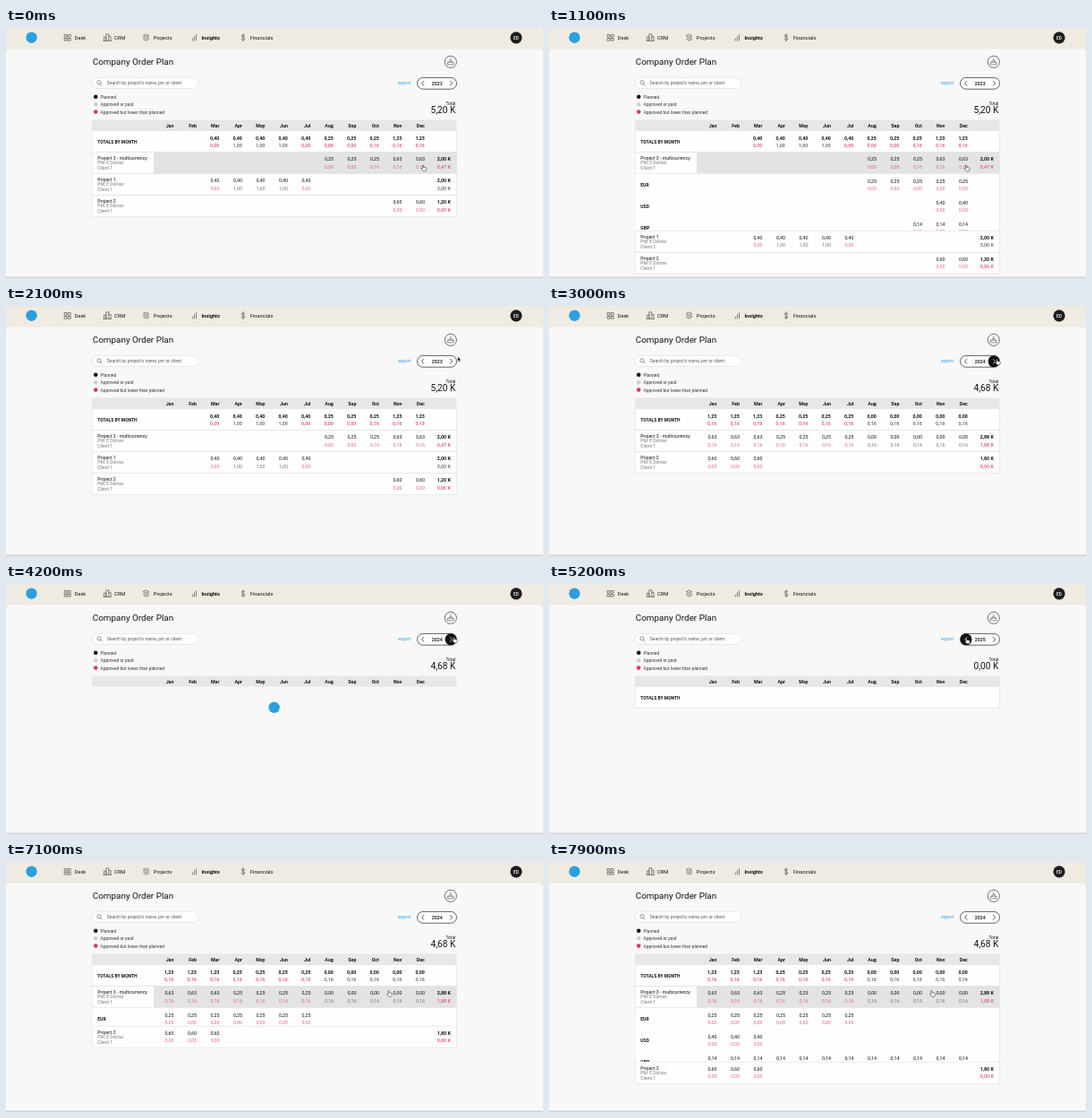
These frames come from a looping animation (600 px wide and 279 px high, 8000 ms). An HTML page:

```html
<!DOCTYPE html>
<html lang="en">
<head>
<meta charset="utf-8">
<title>Company Order Plan</title>
<style>
  html, body { margin: 0; width: 100%; height: 100%; overflow: hidden; background: #f8f8f8; }
  svg { display: block; width: 100%; height: 100%; }
  text { font-family: Roboto, Inter, sans-serif; white-space: pre; }
</style>
</head>
<body>
<svg id="stage" viewBox="0 0 600 279">
  <defs>
    <clipPath id="page"><rect width="600" height="275.5"/></clipPath>
    <clipPath id="drawer"><rect id="drawerClip" x="96" y="162.5" width="408" height="0"/></clipPath>
  </defs>
</svg>
<script>
const LOOP = 8000, ROW = 24, TABLE = { x: 96, w: 407.5 };
const INK = '#111', GREY = '#777', PINK = '#e0688f', LINE = '#dedede', BLUE = '#2b9fe0';
const MONTHS = 'Jan Feb Mar Apr May Jun Jul Aug Sep Oct Nov Dec'.split(' ');
const PM = 'PM: E Dolivar';

// Cells are runs: [first month, count, planned, approved]
const YEARS = {
  2023: {
    total: '5,20 K',
    months: [[2, 1, .4, 0], [3, 3, .4, 1], [6, 1, .4, 0], [7, 2, .25, 0], [9, 1, .25, .16], [10, 2, 1.23, .16]],
    projects: [
      { name: 'Project 3 - multicurrency', cells: [[7, 2, .25, 0], [9, 1, .25, .16], [10, 2, .63, .16]], sum: [2, .47] },
      { name: 'Project 1', cells: [[2, 1, .4, 0], [3, 3, .4, 1], [6, 1, .4, 0]], sum: [2, 3] },
      { name: 'Project 2', cells: [[10, 2, .6, 0]], sum: [1.2, 0] }
    ],
    currencies: { EUR: [[7, 5, .25, 0]], USD: [[10, 2, .4, 0]], GBP: [[9, 3, .14, 0]] }
  },
  2024: {
    total: '4,68 K',
    months: [[0, 3, 1.23, .16], [3, 4, .25, .16], [7, 5, 0, .16]],
    projects: [
      { name: 'Project 3 - multicurrency', cells: [[0, 3, .63, .16], [3, 4, .25, .16], [7, 5, 0, .16]], sum: [2.88, 1.88] },
      { name: 'Project 2', cells: [[0, 3, .6, 0]], sum: [1.8, 0] }
    ],
    currencies: { EUR: [[0, 7, .25, 0]], USD: [[0, 3, .4, 0]], GBP: [[0, 12, .14, 0]] }
  },
  2025: { total: '0,00 K', months: [], projects: [], currencies: {} }
};

// [start, year, loading]
const SCENES = [[0, 2023, 0], [2500, 2023, 1], [2900, 2024, 0], [4200, 2024, 1],
  [4500, 2025, 0], [5500, 2025, 1], [5800, 2024, 0]];

// [time, x, y]
const POINTER = [[1550, 465, 153], [1700, 478, 128], [1800, 498, 95], [1900, 511, 65], [2000, 513, 51],
  [2100, 504.7, 56.3], [2200, 500.5, 59], [2400, 499.5, 59], [4750, 499.5, 59], [5000, 482, 61],
  [5200, 465.5, 60], [5850, 465.5, 60], [5970, 456, 66], [6100, 440.5, 77.5], [6200, 438.5, 93],
  [6300, 437, 103], [6500, 430, 130], [6600, 428, 140], [6700, 426.5, 143.5]];
const NEXT_FILL = [[2130, 0], [2300, 1], [4850, 1], [5050, 0]];
const PREV_FILL = [[5000, 0], [5180, 1], [6080, 1], [6300, 0]];

const stage = document.getElementById('stage');

function add(parent, tag, attrs) {
  const el = document.createElementNS('http://www.w3.org/2000/svg', tag);
  for (const key in attrs) el.setAttribute(key, attrs[key]);
  return parent.appendChild(el);
}
const group = (parent, attrs) => add(parent, 'g', attrs);
const box = (parent, x, y, width, height, fill, more) => add(parent, 'rect', { x, y, width, height, fill, ...more });
const disc = (parent, cx, cy, r, fill, more) => add(parent, 'circle', { cx, cy, r, fill, ...more });
const stroke = (parent, d, color, width, more) => add(parent, 'path',
  { d, fill: 'none', stroke: color, 'stroke-width': width, 'stroke-linecap': 'round', 'stroke-linejoin': 'round', ...more });

// Text centred vertically on cy
function label(parent, x, cy, content, size, fill = INK, weight = 400, anchor = 'start') {
  const el = add(parent, 'text', { x, y: cy + size * .36, 'font-size': size, fill, 'font-weight': weight, 'text-anchor': anchor });
  el.textContent = content;
  return el;
}

const amount = n => n.toFixed(2).replace('.', ',');
const columnEnd = i => 187.4 + 25.5 * i;

function pair(parent, x, y, planned, approved, bold, unit = '') {
  const weight = bold ? 700 : 400;
  label(parent, x, y, amount(planned) + unit, 5.3, INK, weight, 'end');
  label(parent, x, y + 8.2, amount(approved) + unit, 5.3, approved < planned ? PINK : GREY, weight, 'end');
}

function cells(parent, y, runs, bold) {
  for (const [first, count, planned, approved] of runs)
    for (let i = first; i < first + count; i++) pair(parent, columnEnd(i), y, planned, approved, bold);
}

function projectRow(parent, y, project) {
  label(parent, 102.3, y + 6.7, project.name, 5.15);
  label(parent, 102.3, y + 12.2, PM, 4.95, GREY);
  label(parent, 102.3, y + 17.8, 'Client 1', 5, GREY);
  cells(parent, y + 8, project.cells);
  pair(parent, 496.8, y + 8, ...project.sum, true, ' K');
}

function rowBox(parent, y, height) {
  box(parent, TABLE.x, y, TABLE.w, height, '#fefefe', { stroke: LINE, 'stroke-width': .6 });
}

function buildYear(parent, data) {
  const root = group(parent), top = 138.5;
  rowBox(root, 114.5, ROW);
  label(root, 102.3, 127, 'TOTALS BY MONTH', 4.95, INK, 700);
  cells(root, 122.7, data.months, true);
  if (!data.projects.length) return { root };

  rowBox(root, top, ROW);
  const hover = box(root, 165, top, 338.5, ROW, '#e3e3e3');
  projectRow(root, top, data.projects[0]);

  const drawer = group(root, { 'clip-path': 'url(#drawer)' });
  box(drawer, TABLE.x, top + ROW, TABLE.w, ROW * 3, '#fefefe', { stroke: LINE, 'stroke-width': .6 });
  Object.entries(data.currencies).forEach(([code, runs], i) => {
    const y = top + ROW * (i + 1);
    label(drawer, 102.3, y + 12.5, code, 5, INK, 700);
    cells(drawer, y + 8.5, runs);
  });

  const below = group(root);
  data.projects.slice(1).forEach((project, i) => {
    const y = top + ROW * (i + 1);
    rowBox(below, y, ROW);
    projectRow(below, y, project);
  });
  return { root, hover, below };
}

function buildNavigation() {
  box(stage, 0, 0, 600, 30, '#efebe2');
  add(stage, 'path', { d: 'M0 279V28Q0 23.5 5 23.5H595Q600 23.5 600 28V279Z', fill: '#f8f8f8' });
  disc(stage, 28.5, 10.7, 6.2, BLUE);
  const icons = group(stage);
  const pen = d => stroke(icons, d, '#555', .7);
  pen('M65.5 7.5h2.6v2.6h-2.6zM69.6 7.5h2.6v2.6h-2.6zM65.5 11.5h2.6v2.6h-2.6zM69.6 11.5h2.6v2.6h-2.6z');
  pen('M109.5 14.3V10h2.3v4.3M111.8 14.3V6.8h3v7.5M114.8 9.3h2.3v5M109 14.3h8.5');
  pen('M156.7 7.2l3 1.4-3 1.4-3-1.4zM153.7 10.6l3 1.4 3-1.4M153.7 12.6l3 1.4 3-1.4');
  pen('M208.3 14v-2M210.4 14V9.5M212.5 14V7.5');
  pen('M266.8 8.8Q266.4 7.9 265 7.9Q263.3 8 263.3 9.2Q263.4 10.3 265 10.6Q266.8 10.9 266.8 12.2Q266.7 13.4 265 13.4Q263.4 13.4 263 12.3M265 6.8v7.8');
  [['Desk', 76.7], ['CRM', 121], ['Projects', 164.8], ['Insights', 218.4], ['Financials', 272.7]]
    .forEach(([name, x]) => label(stage, x, 10.8, name, 5.7, INK, name === 'Insights' ? 700 : 400));
  disc(stage, 570, 10.8, 6.6, '#1d1d1f');
  label(stage, 570, 10.8, 'ED', 4.8, '#fff', 500, 'middle');
}

function buildToolbar() {
  label(stage, 96.8, 37.8, 'Company Order Plan', 9.9);
  disc(stage, 496.8, 37.8, 6.6, '#fafafa', { stroke: '#333', 'stroke-width': .7 });
  stroke(stage, 'M493.6 38.2h6.4v2.6h-6.4zM495 38l.8-1.6h2l.8 1.6M496.8 34v1.6', '#444', .6);
  box(stage, 96, 55.3, 119, 12.2, '#fff', { rx: 6.1, stroke: '#d8d8d8', 'stroke-width': .6 });
  disc(stage, 104, 60.8, 2.1, 'none', { stroke: '#666', 'stroke-width': .7 });
  stroke(stage, 'M105.6 62.4l1.8 1.8', '#666', .7);
  label(stage, 112.8, 61.4, "Search by project's name, pm or client", 4.98, '#555');
  label(stage, 437.9, 61.5, 'export', 5, BLUE);
  [['Planned', '#111'], ['Approved or paid', '#cfcfcf'], ['Approved but lower than planned', '#d9386c']]
    .forEach(([name, color], i) => {
      disc(stage, 100.2, 76.8 + i * 8.4, 2.3, color);
      label(stage, 105.5, 77 + i * 8.4, name, 4.9, '#333');
    });
  label(stage, 502.3, 84.3, 'Total', 4.9, INK, 400, 'end');
}

function buildPager() {
  box(stage, 459.5, 55.4, 44, 12.8, '#fdfdfd', { rx: 6.4, stroke: '#222', 'stroke-width': .7 });
  const button = (x, d) => ({ disc: disc(stage, x, 61.8, 6.5, '#111'), arrow: stroke(stage, d, INK, .7) });
  return {
    prev: button(466, 'M466.8 59.4l-2.2 2.4 2.2 2.4'),
    next: button(497, 'M496.4 59.4l2.2 2.4-2.2 2.4'),
    year: label(stage, 481.8, 61.8, '', 5.3, INK, 500, 'middle')
  };
}

function buildPointer() {
  const root = group(stage);
  const shape = (d, fill, edge) => add(root, 'path', { d, fill, stroke: edge, 'stroke-width': .5, 'stroke-linejoin': 'round' });
  return {
    root,
    arrow: shape('M0 0V5.6L1.3 4.5 2.2 6.5 3.2 6.1 2.3 4.1H4Z', '#111', '#fff'),
    hand: shape('M.4.4Q1 -.2 1.5.5V2.4Q3.8 2.3 4.7 3.2V5Q4.3 6.4 3.8 6.8H1.3Q0 5.3-.9 4Q-.6 3.2.4 4Z', '#fff', '#111')
  };
}

buildNavigation();
buildToolbar();
const total = label(stage, 502.3, 91.7, '', 10.1, INK, 400, 'end');
const pager = buildPager();
const table = group(stage, { 'clip-path': 'url(#page)' });
box(table, TABLE.x, 102.5, TABLE.w, 12, '#e7e7e6');
MONTHS.forEach((name, i) => label(table, columnEnd(i), 108.6, name, 5.3, INK, 700, 'end'));
const views = {};
for (const year in YEARS) views[year] = buildYear(table, YEARS[year]);
const loader = disc(stage, 299.6, 137.8, 6.2, BLUE);
box(stage, 0, 277.8, 600, .7, '#a9a9a9');
const pointer = buildPointer();
const drawerClip = document.getElementById('drawerClip');

// Interpolates a table of [time, ...values]
function at(steps, t) {
  const i = steps.findIndex(step => step[0] > t);
  if (i === 0) return steps[0].slice(1);
  if (i < 0) return steps[steps.length - 1].slice(1);
  const a = steps[i - 1], b = steps[i], k = (t - a[0]) / (b[0] - a[0]);
  return a.slice(1).map((v, n) => v + (b[n + 1] - v) * k);
}

// cubic-bezier(.4, 0, .2, 1)
function ease(x) {
  if (x <= 0) return 0;
  if (x >= 1) return 1;
  let lo = 0, hi = 1, s = .5;
  for (let n = 0; n < 20; n++) {
    s = (lo + hi) / 2;
    const u = 1 - s;
    if (1.2 * u * u * s + .6 * u * s * s + s ** 3 < x) lo = s; else hi = s;
  }
  return 3 * (1 - s) * s * s + s ** 3;
}

const show = (el, on) => el.setAttribute('visibility', on ? 'visible' : 'hidden');

function render(t) {
  const [, year, loading] = SCENES.filter(scene => scene[0] <= t).pop();
  const slide = start => ease((t - start) / 300);
  const open = 3 * ROW * (slide(60) - slide(1045) + slide(7020) - slide(7837));
  const [x, y] = at(POINTER, t);
  const onRow = y > 138.5 && y < 162.5;
  const onPager = y > 55 && y < 69;
  const onPrev = onPager && x > 459 && x < 473;
  const onNext = onPager && x > 491 && x < 504;

  for (const key in views) {
    const { root, hover, below } = views[key], on = +key === year && !loading;
    root.setAttribute('display', on ? 'inline' : 'none');
    if (!below) continue;
    show(hover, onRow);
    below.setAttribute('transform', `translate(0 ${open})`);
  }
  drawerClip.setAttribute('height', open);
  show(loader, loading);
  total.textContent = YEARS[year].total;
  pager.year.textContent = year;

  [[pager.prev, PREV_FILL, onPrev], [pager.next, NEXT_FILL, onNext]].forEach(([button, fill, on]) => {
    button.disc.setAttribute('opacity', at(fill, t)[0]);
    button.arrow.setAttribute('stroke', on ? '#fff' : INK);
  });

  const hand = onRow || onPrev || onNext;
  pointer.root.setAttribute('transform', `translate(${x} ${y})`);
  show(pointer.hand, hand);
  show(pointer.arrow, !hand);
}

const begin = performance.now();
function tick() {
  render((performance.now() - begin) % LOOP);
  requestAnimationFrame(tick);
}
tick();
</script>
</body>
</html>
```
